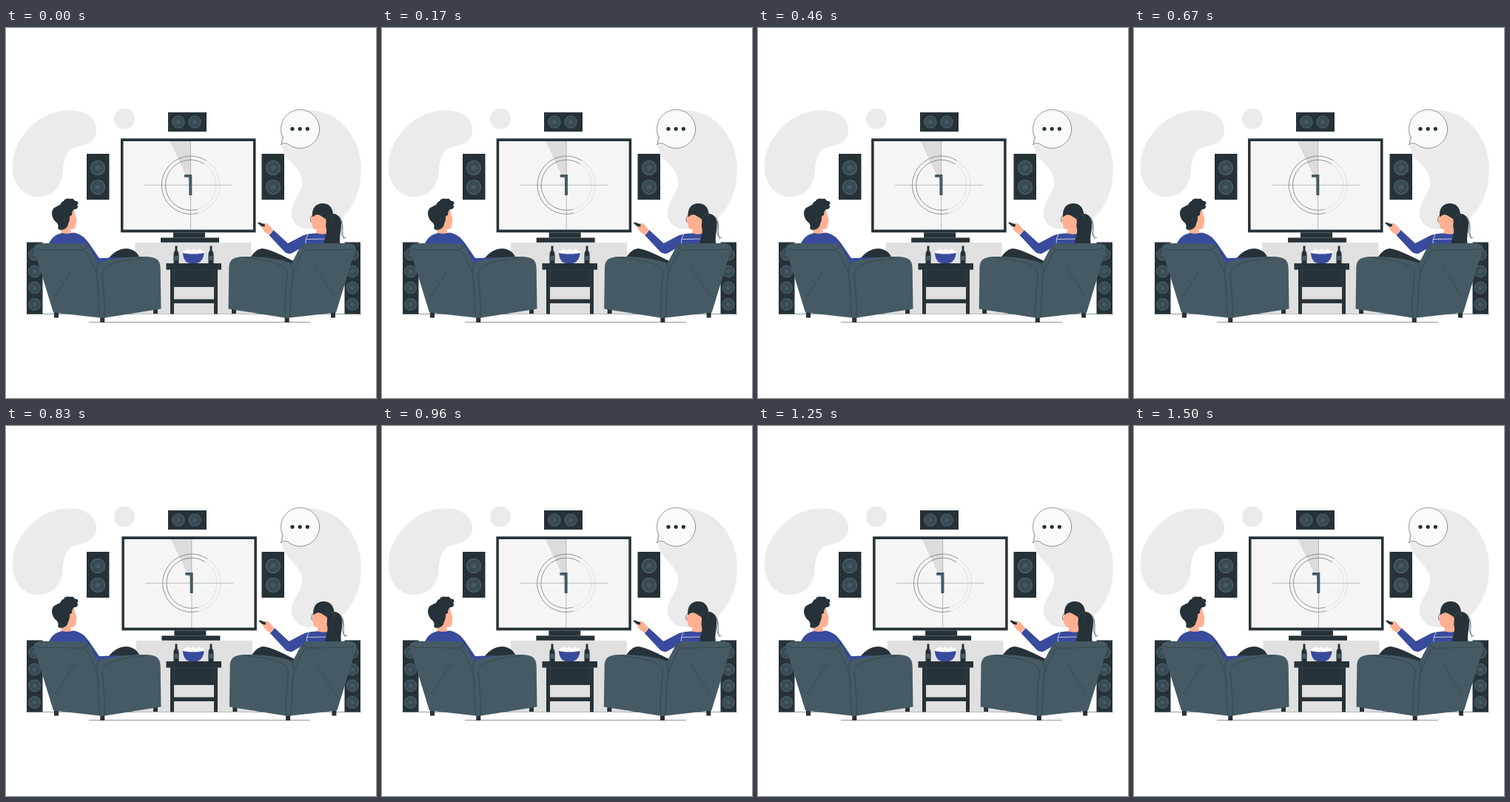
An HTML page with a canvas for the animation above (1.54 s loop, 500 by 500 pixels).

```html
<!DOCTYPE html>
<html lang="en">
<head>
<meta charset="utf-8">
<title>Home cinema</title>
<style>
html, body { margin: 0; width: 100%; height: 100%; overflow: hidden; background: #fff; }
canvas { display: block; width: 500px; height: 500px; }
</style>
</head>
<body>
<canvas id="stage" width="500" height="500"></canvas>
<script>
const ctx = document.getElementById('stage').getContext('2d');
const DARK = '#263238', SLATE = '#455a64', BLUE = '#394b9d', SKIN = '#ffb092';
const PALE = '#ebebeb', GREY = '#e0e0e0', SCREEN = '#f5f5f5';

const LOOP = 1540, SHAKE = 1500, STEP = 1000 / 24;
const SHAKE_KEYS = [0, -0.5, 1, -2, 2, -2, 2, -2, 1, -0.5, 0];

function shape(color, d) {
  ctx.fillStyle = color;
  ctx.fill(new Path2D(d));
}

function line(color, width, d) {
  ctx.strokeStyle = color;
  ctx.lineWidth = width;
  ctx.stroke(new Path2D(d));
}

function box(color, x, y, w, h) {
  ctx.fillStyle = color;
  ctx.fillRect(x, y, w, h);
}

function disc(color, x, y, r) {
  ctx.fillStyle = color;
  ctx.beginPath();
  ctx.arc(x, y, r, 0, 7);
  ctx.fill();
}

function arc(color, width, x, y, r, from = 0, to = 2 * Math.PI) {
  ctx.strokeStyle = color;
  ctx.lineWidth = width;
  ctx.beginPath();
  ctx.arc(x, y, r, from, to);
  ctx.stroke();
}

// CSS "ease": cubic-bezier(.25, .1, .25, 1)
function ease(x) {
  let lo = 0, hi = 1, s = x;
  for (let i = 0; i < 20; i++) {
    s = (lo + hi) / 2;
    const bx = 0.75 * s * (1 - s) + s ** 3;
    if (bx < x) lo = s; else hi = s;
  }
  return 0.3 * (1 - s) ** 2 * s + 3 * (1 - s) * s * s + s ** 3;
}

function shakeOffset(ms) {
  const frame = Math.min(36, Math.floor((ms % LOOP + 5) / STEP));
  const pos = (frame * STEP % SHAKE) / SHAKE * 10;
  const i = Math.min(9, Math.floor(pos));
  return SHAKE_KEYS[i] + (SHAKE_KEYS[i + 1] - SHAKE_KEYS[i]) * ease(pos - i);
}

function cone(x, y, r) {
  disc(SLATE, x, y, r);
  disc('#35464f', x, y, r * 0.8);
  arc(SLATE, 0.8, x, y, r * 0.55);
  disc(SLATE, x, y, r * 0.34);
}

function speaker(x, y, w, h, cones, r) {
  box(DARK, x, y, w, h);
  for (const [cx, cy] of cones) cone(cx, cy, r);
}

function backdrop() {
  shape(PALE, 'M9 180C12 152 38 118 75 112C103 108 123 120 122 139C121 153 109 158 95 161C77 165 78 185 76 200C73 218 60 228 43 228C21 228 6 207 9 180Z');
  disc(PALE, 160, 122.5, 14);
  shape(PALE, 'M372 156C366 120 395 108 420 112C455 118 480 152 480 190C480 235 455 272 412 272C394 272 384 260 386 246C388 232 401 222 400 207C398 185 375 180 372 156Z');
  line(DARK, 0.5, 'M28 386.5H480M112 397.5H411');

  speaker(219, 114, 52, 26, [[233, 127], [255, 127]], 8.7);
  speaker(109, 170, 30.5, 62, [[124, 189], [124, 215]], 10.3);
  speaker(345.5, 170, 30.5, 62, [[361, 189], [361, 215]], 10.3);
  for (const x of [28, 457.5]) {
    speaker(x, 289.5, 21.5, 97, [306, 329, 351, 373.5].map(y => [x + 10.6, y]), 8.5);
  }
}

function bubble() {
  const d = 'M374.5 148.5A26 26 0 1 1 382 157.3C378 154.5 374 155 371.5 158C373.5 154 373 151 374.5 148.5Z';
  shape('#fafafa', d);
  line(DARK, 0.5, d);
  for (const x of [387, 397.2, 407.4]) disc(DARK, x, 136.3, 2.6);
}

function television() {
  box(GREY, 174.5, 290, 157, 96.5);
  box(DARK, 155, 149.3, 182.5, 127);
  box(SCREEN, 158.5, 153, 175.5, 119.5);
  shape('#dcdcdc', 'M221.5 153H249.5V212Z');
  line('#8d9498', 0.6, 'M187 212.3H306M249.5 153V272');
  for (const r of [39.2, 34]) {
    arc('#606b70', 0.7, 249.5, 212.3, r, Math.PI * 0.42, Math.PI * 1.68);
    ctx.setLineDash([2.5, 1.5]);
    arc('#b5babc', 0.6, 249.5, 212.3, r, -Math.PI * 0.32, Math.PI * 0.42);
    ctx.setLineDash([]);
  }
  shape(SLATE, 'M241 198H251.3V226H247.3V201.7H241Z');
  box(DARK, 226, 276.3, 43, 7.2);
  box(DARK, 209, 283.4, 79, 6.4);
  line(SLATE, 0.4, 'M226 283.3H269');
}

function bottle(x) {
  shape(DARK, `M${x - 1.5} 294.5h3v6q2 2.5 2 5v12.5h-7v-12.5q0-2.5 2-5z`);
  box(SLATE, x - 3.5, 308, 7, 6);
}

function table() {
  bottle(230);
  bottle(277);
  for (let i = 0; i < 7; i++) {
    const x = 242 + i * 3.8, y = 303 - (i % 2) * 1.7;
    disc('#fff', x, y, 2.7);
    arc('#d9dcdd', 0.3, x, y, 2.7, 3.4, 5.8);
  }
  shape(BLUE, 'M239 304Q253 307 267.5 304C267.5 312 262 318 257 318H249C243 318 239 311 239 304Z');
  box(DARK, 216.5, 318, 74.5, 8.6);
  box(DARK, 227, 326, 54, 24);
  box(DARK, 222, 326, 5, 60.5);
  box(DARK, 281, 326, 5, 60.5);
  box(DARK, 222, 366.5, 64, 5.5);
  line(SLATE, 0.4, 'M222 326.8H286M227.2 327V350M280.8 327V350');
}

function armchair() {
  box(DARK, 65, 382, 6, 9.5);
  box(DARK, 127.3, 388, 6, 10);
  box(DARK, 199, 377, 6, 9);
  shape(SLATE, 'M37.5 298C37 293 43 291 52 290.8L104 291.5Q110 292 113 297L124 318C140 311 168 308.8 188 309C203 309.2 208.5 313 208.7 325L209.5 379.5L131 392L64 384.5Z');
  line(DARK, 0.5, 'M39 297Q47 301 54 299.5L104 300Q108 301 111 307L122 330C126 348 124 370 127 391');
  line(DARK, 0.5, 'M133 391C134 368 131 345 130 333C130 320 150 314 188 310.5M122 330Q123 321 126 317M104 300Q110 298 111 294');
  line(DARK, 0.4, 'M92 322Q82 340 66 362');
}

function man() {
  shape(DARK, 'M138 312C146 302 154 298 163 298C173 299 178 304 181 311L150 318Z');
  shape(SKIN, 'M84 247L92 246C93 251 94 254 95.5 258C95 262 95 269 92 271.5L87 272L89 280L75 283L74 268Z');
  shape(BLUE, 'M57 294C60 284 67 279 76 277Q84 279 91 276.5C101 278 108 284 115 295L126 311L158 310L135 324L120 325L108 296Z');
  shape(DARK, 'M70 271C72 266 69 263 66 261C62 256 61 250 63 246C64 242 69 242 70 240C74 241 74 234 78 234C80 229 85 231 87 231C91 229 92 233 94 234C97 233 99 237 96 239C99 243 95 245 92 245C90 247 89 248 89 253Q85 253 86 259L83 268Q80 273 73 273Z');
  line(DARK, 0.4, 'M104 281Q113 293 122 311');
}

function woman() {
  shape(DARK, 'M329 312C335 303 340 298 347 298C357 299 372 307 391 316L386 325L345 316Z');
  shape(SKIN, 'M345 266C348 263 352 263 355 266L361 273L356 279.5C350 277 346 273 345 266Z');
  shape(DARK, 'M340 263.5L342 262.5L350 265.5L349.5 268.5L345 268Z');
  shape(SKIN, 'M414 252L436 253L435 281L419 280L420 272C416 272 414 270 414 266L412 262Z');
  shape(BLUE, 'M361.5 273L381 291L402 280Q410 277 420 277.5Q428 280 436 277L447 292L406 293L386 304.5Q380 306.5 376 302L355.5 280Z');
  line('#fff', 0.7, 'M360 274.5L356.5 278.5M408 279Q404 285 405 291M406 285.5L431 285');
  line(DARK, 0.4, 'M381 291L384 293');
  shape(DARK, 'M414 255C413 243 419 237 428 237C436 237 441 242 442 251C449 251 454 258 453 267C452 278 450 285 452 293H430C429 285 434 280 433 272C431 265 434 262 432 258L424 253Q418 251 415 255Z');
  line(DARK, 0.6, 'M415 252Q410 256 412 262M441 253C455 251 456 266 453 273C453 280 456 285 460 283M450 257C459 267 452 278 457 285');
  line(SLATE, 0.5, 'M432 258Q435 251 442 252Q444 257 440 262');
}

function draw(ms) {
  ctx.setTransform(1, 0, 0, 1, 0, 0);
  box('#fff', 0, 0, 500, 500);
  const dx = shakeOffset(ms);

  backdrop();
  bubble();

  ctx.save();
  ctx.translate(dx, 0);
  television();
  ctx.restore();

  table();
  man();
  armchair();

  ctx.save();
  ctx.translate(dx, 0);
  woman();
  ctx.translate(510, 0);
  ctx.scale(-1, 1);
  armchair();
  ctx.restore();
}

const start = performance.now();
function tick(now) {
  draw(Math.max(0, now - start));
  requestAnimationFrame(tick);
}
draw(0);
requestAnimationFrame(tick);
</script>
</body>
</html>
```
